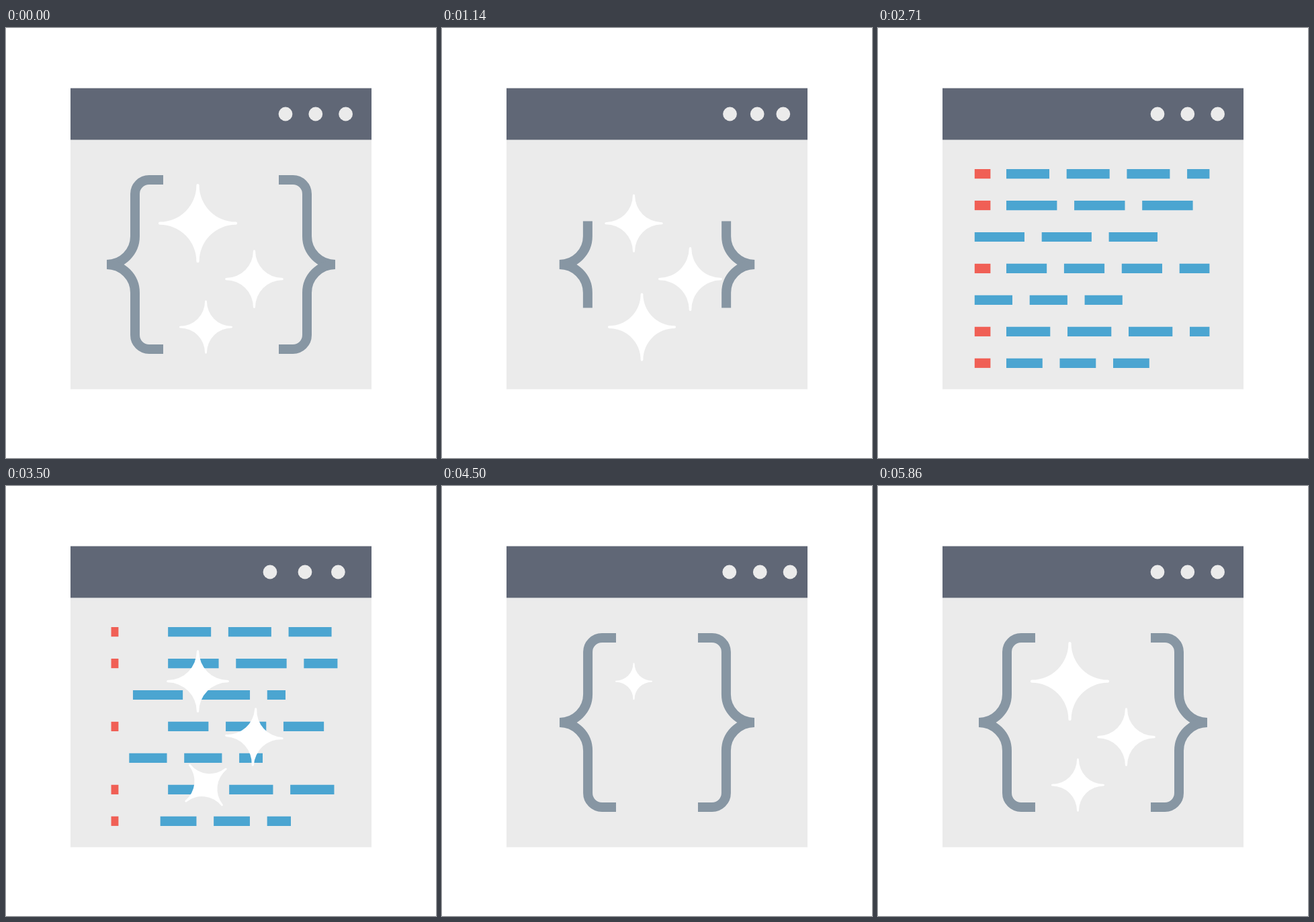
An HTML page with a canvas that plays this animation: 640x640 px, repeating every 6 s.

```html
<!DOCTYPE html>
<html lang="en">
<head>
<meta charset="utf-8">
<title>Code window</title>
<style>
  html, body { margin: 0; width: 100%; height: 100%; overflow: hidden; background: #fff; }
  canvas { display: block; width: 640px; height: 640px; }
</style>
</head>
<body>
<canvas id="stage" width="640" height="640"></canvas>
<script>
const ctx = document.getElementById('stage').getContext('2d');
const LOOP = 6000;
const COLOR = {
  bar: '#606776', panel: '#ebebeb', brace: '#8796a3',
  code: '#4ba5d1', mark: '#f05f55', star: '#fff'
};

const smooth = u => u * u * (3 - 2 * u);
const smoother = u => u * u * u * (u * (6 * u - 15) + 10);

// Eased progress from 0 to 1 between two times.
const ramp = (t, start, end, ease = smooth) =>
  ease(Math.min(1, Math.max(0, (t - start) / (end - start))));

// Value at time t when moving through [time, value] keys in order.
function track(t, keys, ease) {
  let value = keys[0][1];
  for (let i = 1; i < keys.length; i++) {
    const [start, from] = keys[i - 1], [end, to] = keys[i];
    value += (to - from) * ramp(t, start, end, ease);
  }
  return value;
}

function drawWindow() {
  ctx.fillStyle = COLOR.panel;
  ctx.fillRect(96, 89.6, 448, 448);
  ctx.fillStyle = COLOR.bar;
  ctx.fillRect(96, 89.6, 448, 76.8);
}

// Title bar dots swing left, overshoot right and settle, twice per loop.
const SWING = [[0, 0], [580, -25.6], [605, -25.6], [1115, 12.5], [1390, 12.5], [1910, 0]];
const SECOND_SWING = 3035;

function drawDots(t) {
  const time = t < SECOND_SWING ? t : t - SECOND_SWING;
  ctx.fillStyle = COLOR.panel;
  [0, 130, 200].forEach((lag, i) => {
    ctx.beginPath();
    ctx.arc(416 + 44.8 * i + track(time - lag, SWING), 128, 10.4, 0, 7);
    ctx.fill();
  });
}

// Braces leave with a wobble and come back along the same path reversed.
const BRACE_PATH = [[0, 0], [610, -13], [1200, 25.2], [1880, -38.5]];
const BRACE_RETURN = 5740;
const HALF_BRACE = 21 + 63 + (42 + 21) * Math.PI / 2;

function drawBraces(t) {
  const shown = 1 - ramp(t, 146, 2091) + ramp(t, 3835, 4545, smoother);
  if (shown <= 0) return;
  const shift = track(Math.min(t, BRACE_RETURN - t), BRACE_PATH, smoother);
  ctx.strokeStyle = COLOR.brace;
  ctx.lineWidth = 14;
  ctx.setLineDash([HALF_BRACE * shown, 999]);
  for (const sx of [1, -1]) for (const sy of [1, -1]) {
    ctx.save();
    ctx.translate(320, 352);
    ctx.scale(sx, sy);
    ctx.translate(shift - 170, 0);
    ctx.beginPath();
    ctx.moveTo(0, 0);
    ctx.arc(0, -42, 42, Math.PI / 2, 0, true);
    ctx.lineTo(42, -105);
    ctx.arc(63, -105, 21, Math.PI, Math.PI * 1.5);
    ctx.lineTo(84, -126);
    ctx.stroke();
    ctx.restore();
  }
  ctx.setLineDash([]);
}

const LEFT = 143.8, INDENT = 191, RIGHT = 493.4, GAP = 25.7;
const marked = (dash, end = RIGHT) => ({ start: INDENT, end, dash });
const plain = (dash, end) => ({ start: LEFT, end, dash });
const ROWS = [
  marked(64), marked(75.4), plain(74.2, 416), marked(60.2),
  plain(56.2, 382), marked(65.3), marked(53.8, 424)
];

// Draws the part of a horizontal line between two fractions of its length.
function drawSpan(x0, x1, y, from, to, color, dash = []) {
  if (to <= from) return;
  ctx.strokeStyle = color;
  ctx.lineWidth = 14.2;
  ctx.setLineDash(dash);
  ctx.beginPath();
  ctx.moveTo(x0 + (x1 - x0) * from, y);
  ctx.lineTo(x0 + (x1 - x0) * to, y);
  ctx.stroke();
  ctx.setLineDash([]);
}

function drawCode(t) {
  const from = ramp(t, 3280, 4135), to = ramp(t, 1730, 2570);
  const markFrom = ramp(t, 3280, 3700), markTo = ramp(t, 1730, 2150);
  ROWS.forEach(({ start, end, dash }, i) => {
    const y = 217.1 + 46.95 * i;
    if (start === INDENT) drawSpan(LEFT, 167.4, y, markFrom, markTo, COLOR.mark);
    drawSpan(start, end, y, from, to, COLOR.code, [dash, GAP]);
  });
}

// All stars share one motion, each with its own lag.
const STARS = [
  { x: 285.5, y: 290.7, r: 58.6, lag: 445 },
  { x: 369.5, y: 373.6, r: 43.3, lag: 165 },
  { x: 297.5, y: 445.1, r: 39.6, lag: 0 }
];
const STAR_SCALE = [
  [0, 1], [605, .7], [1210, 1.3], [1780, 0], [2710, 0], [3200, 1],
  [3780, 1], [4310, 0], [4515, 0], [4965, 1.3], [5415, 1]
];

function drawStar(t, { x, y, r, lag }) {
  const size = r * track(t - lag, STAR_SCALE);
  if (size < .1) return;
  const w = size * .036, c = size - w;
  ctx.save();
  ctx.translate(x, y);
  ctx.rotate(Math.PI * ramp(t - lag, 3290, 3890));
  ctx.beginPath();
  for (let i = 0; i < 4; i++) {
    ctx.arc(0, -c, w, Math.PI, 0);
    ctx.arc(c, -c, c - w, Math.PI, Math.PI / 2, true);
    ctx.rotate(Math.PI / 2);
  }
  ctx.closePath();
  ctx.fillStyle = COLOR.star;
  ctx.fill();
  ctx.restore();
}

function draw(t) {
  ctx.fillStyle = '#fff';
  ctx.fillRect(0, 0, 640, 640);
  drawWindow();
  drawDots(t);
  drawCode(t);
  drawBraces(t);
  STARS.forEach(star => drawStar(t, star));
}

const began = performance.now();
function tick() {
  draw((performance.now() - began) % LOOP);
  requestAnimationFrame(tick);
}
tick();
</script>
</body>
</html>
```
